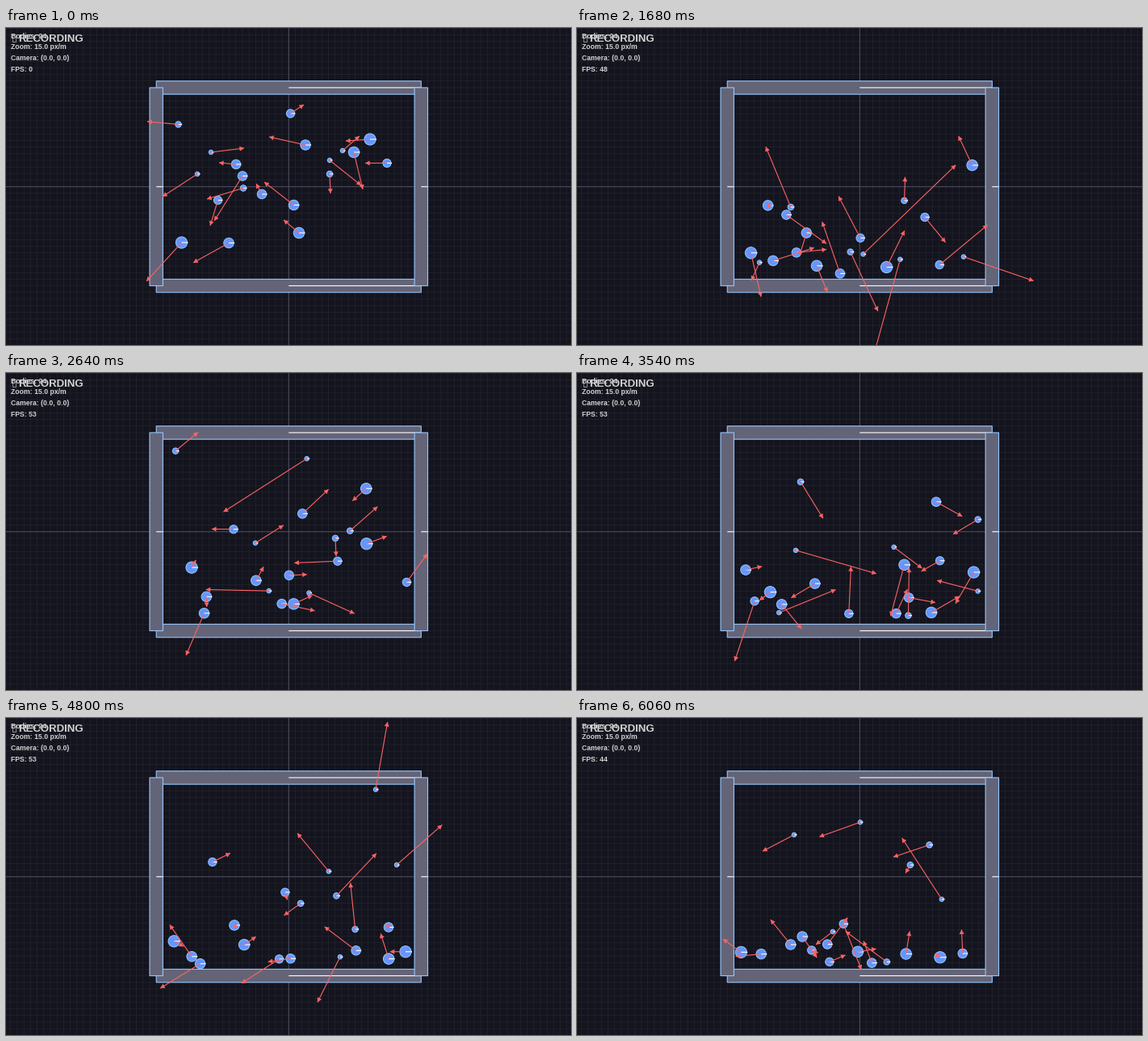
These frames come from a looping animation (700 px wide and 393 px high, 6120 ms). A matplotlib script:

```python
import numpy as np
import matplotlib.pyplot as plt
from matplotlib.animation import FuncAnimation
from matplotlib.collections import LineCollection, PolyCollection
from matplotlib.patches import Circle, Rectangle

W, H, DPI = 700, 393, 100
FRAMES, INTERVAL = 102, 60
CX, CY = 350.27, 196.77               # world origin on screen
UX, UY = 15 * W / 1280, 15 * H / 720  # pixels per metre
DT, SUB, ARROW = 0.08, 10, 0.5        # seconds and steps per frame, arrow per speed
G, BOUNCE = 9.81 * UX, 0.9

BG, GRID, AXIS = "#14141e", "#282832", "#505064"
WALL, BALL, EDGE = "#646478", "#6496ff", "#96c8ff"
RED, TEXT = "#ff6464", "#d2d2d2"

# Opening state of each ball: radius, x, y and its velocity arrow.
START = np.array([
    (4, 213.5, 119.5, -38.5, -3.5), (5.4, 352.5, 106, 16.5, -11),
    (6.5, 371, 145, -45, -10), (7.4, 451, 138, -30, 2),
    (7, 431, 154, 11, 46), (3, 417, 152, 21, -18),
    (5.4, 472, 167.5, -27, 0), (3, 401, 164, 39, 31),
    (4, 401, 181, 1, 24), (3, 254, 154, 41, -5),
    (6, 285, 169, -21, -2), (6, 293, 183.5, -35, 55.5),
    (3, 237, 181, -43, 28), (4, 294, 198.5, -45, 13.5),
    (5.4, 262.5, 213.5, -9.5, 31.5), (6, 317, 206, -7, -13),
    (6.5, 356.5, 219.5, -36.5, -28.5), (7, 363, 254, -19, -16),
    (7.4, 217.5, 266, -43.5, 48), (6.5, 276, 266.5, -44, 24.5),
])
R = START[:, 0]
MASS = R ** 2
LOW = np.array([CX - 19 * UX, CY - 14 * UY]) + R[:, None]
HIGH = np.array([CX + 19 * UX, CY + 14 * UY]) - R[:, None]
I, J = np.triu_indices(len(R), 1)


def collide(pos, vel):
    """Resolve every touching pair with an impulse and push it apart."""
    gap = np.hypot(*(pos[J] - pos[I]).T) - R[I] - R[J]
    for i, j in zip(I[gap < 0], J[gap < 0]):
        d = pos[j] - pos[i]
        dist = max(np.hypot(*d), 1e-6)
        n = d / dist
        share = MASS[j] / (MASS[i] + MASS[j])
        depth = max(R[i] + R[j] - dist, 0)
        pos[i] -= n * depth * share
        pos[j] += n * depth * (1 - share)
        speed = (vel[j] - vel[i]) @ n
        if speed < 0:
            kick = (1 + BOUNCE) * speed * n
            vel[i] += kick * share
            vel[j] -= kick * (1 - share)


def simulate():
    pos, vel = START[:, 1:3].copy(), START[:, 3:] / ARROW
    h = DT / SUB
    path = [(pos.copy(), vel * ARROW)]
    for _ in range(FRAMES - 1):
        for _ in range(SUB):
            pos += vel * h
            pos[:, 1] += G * h * h / 2
            vel[:, 1] += G * h
            collide(pos, vel)
            out = ((pos < LOW) & (vel < 0)) | ((pos > HIGH) & (vel > 0))
            vel[out] *= -BOUNCE
            pos = np.clip(pos, LOW, HIGH)
        path.append((pos.copy(), vel * ARROW))
    return path


def fps(i):
    """Frame rate readout: warms up, holds, then sags at the end."""
    i -= i % 3
    return round(min(53, 37 + 0.4 * i) - 0.6 * max(0, i - 84)) if i else 0


def px(n):
    return n * 72 / DPI


path = simulate()
fig = plt.figure(figsize=(W / DPI, H / DPI), dpi=DPI, facecolor=BG)
ax = fig.add_axes([0, 0, 1, 1])
ax.set_xlim(0, W)
ax.set_ylim(H, 0)
ax.axis("off")


def lines(segs, color, width, z):
    c = LineCollection(segs, colors=color, linewidths=px(width), zorder=z, capstyle="butt")
    c.set_snap(False)
    return ax.add_collection(c)


def label(x, y, s, size):
    return ax.text(x, y, s, color=TEXT, fontsize=px(size), family="Liberation Sans",
                   weight="bold", va="baseline", zorder=20)


def wall(x, y, w, h, z):
    ax.add_patch(Rectangle((x - w / 2, y - h / 2), w, h, fc=WALL, ec=EDGE,
                           lw=px(1.1), zorder=z, snap=False))
    lines([[(x, y), (x + w / 2, y)]], "white", 1.1, z + 0.1)


cols = CX + UX * np.arange(-43, 44)
rows = CY + UY * np.arange(-24, 25)
lines([[(x, 0), (x, H)] for x in cols], GRID, 0.55, 1)
lines([[(0, y), (W, y)] for y in rows], GRID, 0.55, 1)
lines([[(CX, 0), (CX, H)], [(0, CY), (W, CY)]], AXIS, 1.0, 2)

for side in (1, -1):
    wall(CX, CY + side * 15 * UY, 40 * UX, 2 * UY, 3)
for side in (-1, 1):
    wall(CX + side * 20 * UX, CY, 2 * UX, 30 * UY, 4)

discs = [ax.add_patch(Circle((0, 0), r - 0.3, fc=BALL, ec=EDGE, lw=px(1), zorder=6)) for r in R]
ticks = lines([], "white", 1.1, 7)
shafts = lines([], RED, 1.1, 8)
heads = ax.add_collection(PolyCollection([], facecolors=RED, edgecolors="none", zorder=9))

info = ["Bodies: 24", "Zoom: 15.0 px/m", "Camera: (0.0, 0.0)", "FPS: 0"]
labels = [label(5.6, 12.7 + 13.65 * k, s, 8.65) for k, s in enumerate(info)]
ax.add_patch(Rectangle((8, 8.2), 3.6, 9, fill=False, ec=TEXT, lw=px(0.6), zorder=20))
label(14.7, 16.8, "RECORDING", 13.2)


def head(tip, d):
    u = d / max(np.hypot(*d), 1e-6)
    n = np.array([-u[1], u[0]])
    base = tip - 5.6 * u
    return [tip, base + 3 * n, base - 3 * n]


def draw(i):
    pos, arrow = path[i]
    for disc, p in zip(discs, pos):
        disc.center = p
    tips = pos + arrow
    ticks.set_segments([[p, p + (r + 0.6, 0)] for p, r in zip(pos, R)])
    shafts.set_segments(np.stack([pos, tips], axis=1))
    heads.set_verts([head(t, d) for t, d in zip(tips, arrow)])
    labels[-1].set_text(f"FPS: {fps(i)}")
    return [*discs, ticks, shafts, heads, labels[-1]]


anim = FuncAnimation(fig, draw, frames=FRAMES, interval=INTERVAL, repeat=True, repeat_delay=0)
plt.show()
```
